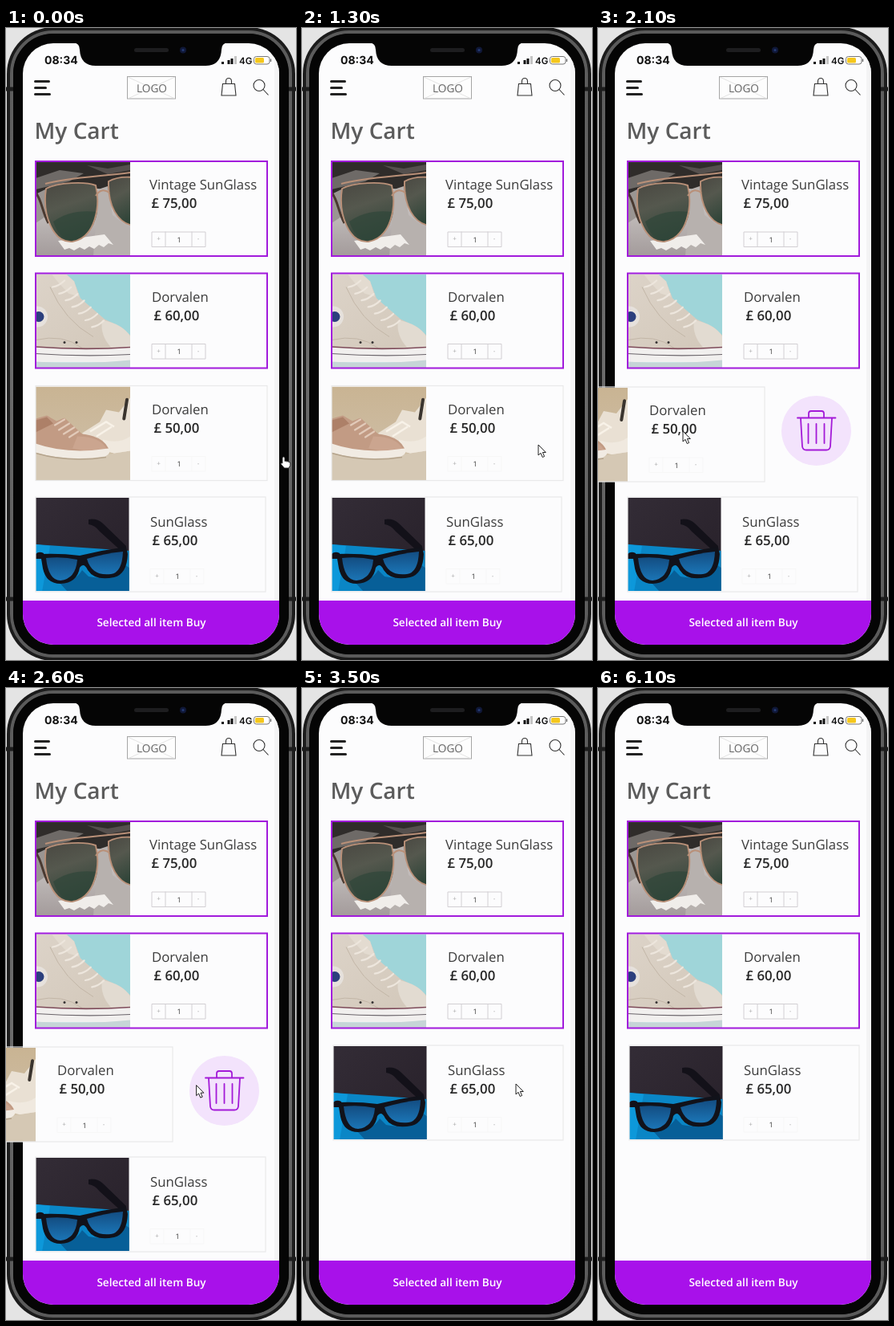
Recreate the animation shown at these times as an HTML page. Size 362 px wide and 787 px high, loop 6200 ms.

```html
<!DOCTYPE html>
<html lang="en">
<head>
<meta charset="utf-8">
<title>My Cart</title>
<style>
html, body { margin: 0; width: 100%; height: 100%; overflow: hidden; background: #e4e4e4; }
svg { display: block; width: 362px; height: 787px; }
text { font-family: "Open Sans", "Noto Sans", sans-serif; text-rendering: geometricPrecision; }
.name { font-size: 16.75px; fill: #3c3c3c; }
.price { font-size: 16.8px; font-weight: 600; fill: #262626; }
.qty { font-size: 9px; fill: #333; text-anchor: middle; }
.sign { font-size: 8px; fill: #aaa; text-anchor: middle; }
.status { font-family: Inter, "Liberation Sans", sans-serif; fill: #111; }
</style>
</head>
<body>
<svg viewBox="0 0 362 787" xmlns="http://www.w3.org/2000/svg">
  <defs>
    <linearGradient id="lens" x1=".2" y1="0" x2=".5" y2="1">
      <stop offset="0" stop-color="#4b4a43"/><stop offset=".4" stop-color="#55584e"/><stop offset="1" stop-color="#2f4438"/>
    </linearGradient>
    <linearGradient id="cloth" x1="0" y1="0" x2="0" y2="1">
      <stop offset="0" stop-color="#cbc7c4"/><stop offset=".5" stop-color="#c4bfbd"/><stop offset="1" stop-color="#a39b9b"/>
    </linearGradient>
    <linearGradient id="blueLens" x1="0" y1="0" x2="0" y2="1">
      <stop offset="0" stop-color="#134d82"/><stop offset="1" stop-color="#1b75b6"/>
    </linearGradient>
    <linearGradient id="night" x1="0" y1="0" x2="1" y2="1">
      <stop offset="0" stop-color="#332c36"/><stop offset="1" stop-color="#272029"/>
    </linearGradient>
    <linearGradient id="sand" x1="0" y1="0" x2="0" y2="1">
      <stop offset="0" stop-color="#c9b493"/><stop offset=".6" stop-color="#cdbca2"/><stop offset="1" stop-color="#d6c9b5"/>
    </linearGradient>
    <linearGradient id="canvas" x1="0" y1="0" x2="1" y2="1">
      <stop offset="0" stop-color="#dcd3c8"/><stop offset="1" stop-color="#d2c7b9"/>
    </linearGradient>
    <linearGradient id="steel" x1="0" y1="0" x2="0" y2="1">
      <stop offset="0" stop-color="#5a5a5a"/><stop offset=".5" stop-color="#6d6d6d"/><stop offset="1" stop-color="#5a5a5a"/>
    </linearGradient>
    <clipPath id="photo"><rect width="118" height="117"/></clipPath>
    <clipPath id="smallPhoto"><rect width="116.500" height="116"/></clipPath>
    <clipPath id="screen"><rect x="21" y="19" width="320" height="749" rx="38"/></clipPath>

    <g id="aviators" clip-path="url(#photo)">
      <rect width="118" height="117" fill="url(#cloth)"/>
      <path d="M0 0H118V50L84 34 40 28 0 42Z" fill="#2f2c2a"/>
      <path d="M0 20L30 10 60 14 42 24 0 34Z" fill="#6e6a67"/>
      <path d="M64 4L90 8 118 3V10L90 15Z" fill="#55504e"/>
      <path d="M0 40L12 34 15 66 0 76Z" fill="#9a9592"/>
      <path d="M78 34L90 30 96 66 118 84V117H72Z" fill="#b7b1ae"/>
      <path d="M28 98L86 90 97 103 91 101 85 106 79 103 73 108 67 105 61 109 55 106 48 110 42 107 36 109Z" fill="#f0edea"/>
      <path d="M0 38C8 48 8 62 16 76" fill="none" stroke="#4a3a31" stroke-width="3"/>
      <path d="M13 33C28 25 62 24 75 29C81 54 75 94 46 99C22 101 8 66 13 33Z" fill="url(#lens)"/>
      <path d="M22 74Q44 58 77 62Q72 92 46 98Q30 97 22 74Z" fill="#30463a" opacity=".7"/>
      <path d="M91 24C100 19 112 18 122 19V79C102 76 90 54 91 24Z" fill="url(#lens)"/>
      <g fill="none" stroke="#b99078" stroke-width="1.900">
        <path d="M13 33C28 25 62 24 75 29C81 54 75 94 46 99C22 101 8 66 13 33Z"/>
        <path d="M91 24C100 19 112 18 122 19V79C102 76 90 54 91 24Z"/>
        <path d="M12 27C40 19 82 18 118 13M75 42Q82 31 92 38"/>
      </g>
    </g>

    <g id="hightop" clip-path="url(#photo)">
      <rect width="118" height="117" fill="#9fd5d9"/>
      <path d="M0 0H38L48 9 56 30 86 56 107 66 118 76V98H0Z" fill="url(#canvas)"/>
      <path d="M20 0H38L48 9 54 28 41 24 28 10Z" fill="#e3dbd0"/>
      <path d="M83 57Q108 62 118 77V91H94Q80 76 83 57Z" fill="#e2dbd1"/>
      <path d="M18 16Q36 58 72 78M0 82Q34 74 58 92" fill="none" stroke="#c2b6a7"/>
      <g fill="none" stroke="#ede6dd" stroke-width="2.200" stroke-linecap="round" id="laces"></g>
      <circle cx="2" cy="53" r="13" fill="#e6e1dc"/>
      <circle cx="4" cy="53" r="6.500" fill="#2b3f7d"/>
      <circle cx="36" cy="85" r="1.500" fill="#383434"/><circle cx="51" cy="85" r="1.500" fill="#383434"/>
      <path d="M0 90Q60 95 118 90V110H0Z" fill="#f1efee"/>
      <path d="M0 90.500Q60 95 118 91" fill="none" stroke="#7d4a58" stroke-width="1.600"/>
      <path d="M0 99Q60 103 118 100" fill="none" stroke="#6a646a" stroke-width="1.200"/>
      <path d="M0 109Q60 113 118 107V117H0Z" fill="#c6d5d7"/>
    </g>

    <g id="trainers" clip-path="url(#photo)">
      <rect width="118" height="117" fill="url(#sand)"/>
      <path d="M0 82Q60 96 118 78V117H0Z" fill="#d5c8b4"/>
      <path d="M58 58L80 44 88 29 104 32 118 14V80L98 83 74 78Z" fill="#e9e0d3"/>
      <path d="M68 56L88 44 98 50M76 62L95 50" fill="none" stroke="#f8f2e8" stroke-width="2.500"/>
      <path d="M84 66Q104 72 118 62V80L98 83 82 78Z" fill="#f0e9df"/>
      <rect x="110" y="14" width="4" height="28" rx="2" transform="rotate(9 111 29)" fill="#3a342e"/>
      <path d="M0 40L14 36 26 43 36 39 58 59Q84 62 91 77L90 84Q40 90 0 74Z" fill="#c29b84"/>
      <path d="M0 42L14 38 22 46 0 57Z" fill="#ad8068"/>
      <path d="M52 62Q80 62 89 78Q66 82 46 77Z" fill="#cba58f"/>
      <path d="M24 48L36 41M29 54L42 46M35 59L48 51M42 63L53 56" stroke="#e2cab9" stroke-width="2.200" stroke-linecap="round"/>
      <path d="M0 71Q40 85 91 77Q95 83 87 87Q40 94 0 82Z" fill="#f1ebe3"/>
      <path d="M0 83Q42 95 88 88" fill="none" stroke="#b5a48d" stroke-width="1.500"/>
    </g>

    <g id="shades" clip-path="url(#smallPhoto)">
      <rect width="118" height="117" fill="url(#night)"/>
      <path d="M0 58L118 66V117H0Z" fill="#0a86c6"/>
      <path d="M0 58L18 60 8 117H0Z" fill="#0d98da"/>
      <path d="M30 106Q50 104 58 90L66 98Q92 104 112 84L118 88V117H40Z" fill="#075f98"/>
      <path d="M66 27Q76 25 84 32L113 60 111 70 80 42Q74 34 66 33Z" fill="#131119"/>
      <path d="M0 70Q4 66 10 69L11 76H0Z" fill="#131119"/>
      <path d="M6 70Q32 69 55 72Q84 65 113 61L115 70Q114 95 98 99Q74 104 65 90Q60 80 55 87Q52 106 31 107Q13 107 9 88Z" fill="#11121a"/>
      <path d="M13 75Q34 73 52 77Q50 101 31 103Q16 103 13 75Z" fill="url(#blueLens)"/>
      <path d="M64 76Q88 69 109 67Q108 93 94 95Q70 98 64 76Z" fill="url(#blueLens)"/>
    </g>
  </defs>

  <!-- phone -->
  <rect width="362" height="787" fill="#e4e4e4"/>
  <path d="M0 76H6M356 76H362M0 711H6M356 711H362" stroke="#1c1c1c" stroke-width="5"/>
  <rect x="1" y="-1" width="360" height="789" rx="58" fill="#1b1b1b"/>
  <rect x="7" y="5" width="348" height="777" rx="52" fill="none" stroke="url(#steel)" stroke-width="4"/>
  <rect x="9" y="7" width="344" height="773" rx="50" fill="#050505"/>
  <path d="M1 76H9M353 76H361M1 711H9M353 711H361" stroke="#1c1c1c" stroke-width="5"/>
  <g clip-path="url(#screen)">
    <rect x="21" y="19" width="320" height="749" fill="#fcfcfd"/>
    <rect x="335" y="19" width="6" height="694" fill="#f4f4f5"/>
  </g>
  <path d="M84 18Q92 19 92 27Q93 47 112 47H249Q268 47 269 27Q269 19 277 18Z" fill="#050505"/>
  <rect x="160" y="25" width="43" height="5" rx="2.500" fill="#1d1d1f"/>
  <circle cx="221" cy="27.500" r="4" fill="#101838"/><circle cx="221" cy="27.500" r="1.600" fill="#243a72"/>

  <!-- status bar and header -->
  <text class="status" x="48" y="45" font-size="14" font-weight="700">08:34</text>
  <path d="M269 42h3v3h-3zM276.500 40h3v5h-3zM280.500 38h3v7h-3z" fill="#111"/>
  <path d="M285 35h3v10h-3z" fill="#c4c4c4"/>
  <text class="status" x="291" y="45" font-size="11.5" font-weight="600">4G</text>
  <rect x="309.500" y="35.500" width="19.500" height="9.500" rx="3" fill="#fff" stroke="#777"/>
  <rect x="311" y="37" width="11" height="6.500" rx="1.500" fill="#f5c71c"/>
  <path d="M330.500 38.500v3.500" stroke="#777" stroke-width="1.500"/>
  <path d="M36.500 66.500H53.500M36.500 74.500H49.500M36.500 82.500H54.500" stroke="#222" stroke-width="3" stroke-linecap="round"/>
  <rect x="151.500" y="60.500" width="60" height="27.500" fill="#fdfdfd" stroke="#a5a5a5"/>
  <path d="M152 61L211 88M211 61L152 88" stroke="#dedede" stroke-width=".8"/>
  <text x="182" y="80" font-size="13.6" fill="#666" text-anchor="middle">LOGO</text>
  <g fill="none" stroke="#333" stroke-width="1.100">
    <path d="M270.500 69.500H285.500L287 84H269ZM274.500 69.500V66.500Q274.500 62.500 278 62.500T281.500 66.500V69.500"/>
    <circle cx="316" cy="71.500" r="7"/><path d="M321 76.500L327.500 83.500"/>
  </g>
  <text x="35.500" y="138" font-size="28" font-weight="600" fill="#5c5c5c">My Cart</text>

  <g id="cards"></g>

  <g id="trash">
    <circle cx="272.500" cy="501.500" r="43.500" fill="#f3e3fc"/>
    <g fill="none" stroke="#a31ad8" stroke-width="1.800" stroke-linecap="round" stroke-linejoin="round">
      <path d="M249 485.500H296.500M263 485V480Q263 477 266 477H279Q282 477 282 480V485"/>
      <path d="M253 486L255 521Q255.500 525.500 260 525.500H285Q289.500 525.500 290 521L292 486"/>
      <path d="M262.500 493V517M272.500 493V517M282.500 493V517"/>
    </g>
  </g>

  <g clip-path="url(#screen)"><rect x="21" y="713" width="320" height="56" fill="#a811ea"/></g>
  <text x="181.500" y="745" font-size="13.6" font-weight="600" fill="#fff" text-anchor="middle">Selected all item Buy</text>

  <g id="pointer" stroke="#222" stroke-linejoin="round" fill="#fff">
    <path id="arrow" d="M0 0V13L3 10.300 5.200 15.500 7.600 14.500 5.400 9.500H9.300Z"/>
    <path id="hand" d="M0 1Q1.500-1 3 1V5.500Q4.500 4.500 5.500 6Q7 5 8 6.500Q9.800 6 9.800 8V10.500L8 14H2.500L-2 9Q-2.500 7 0 8Z" stroke-width=".9"/>
  </g>
</svg>
<script>
const LOOP = 6200, STEP = 100;
const el = id => document.getElementById(id);

let laces = "";
for (let i = 0; i < 7; i++) {
  const x = 21 + i * 8.2, y = 9 + i * 8.3;
  laces += `<path d="M${x} ${y + 7}Q${x + 8} ${y + 6} ${x + 15} ${y - 1}"/>`;
}
el("laces").innerHTML = laces;

// x is the left edge of the quantity box, y the baseline of the name
function card({ id, photo, name, nameX, price, top, width = 289, x = 182, y = top + 35.5, chosen }) {
  const q = y + 52.5, line = chosen ? "#d2cfd3" : "#f7f7f7";
  return `<g id="${id}">
    <use href="#${photo}" x="37" y="${top + 1.5}"/>
    <rect x="37" y="${top + .5}" width="${width}" height="118" fill="none"
      stroke="${chosen ? "#a21bdc" : "#e9e9ea"}" stroke-width="${chosen ? 2 : 1.2}"/>
    <text class="name" x="${nameX ?? x}" y="${y}">${name}</text>
    <text class="price" x="${(nameX ?? x) + 2.5}" y="${y + 23}">£ ${price},00</text>
    <path d="M${x} ${q + .5}h67v18.500h-67zM${x + 17} ${q}v19M${x + 50} ${q}v19" fill="none" stroke="${line}"/>
    <text class="sign" x="${x + 8.5}" y="${q + 11.5}">+</text>
    <text class="qty" x="${x + 34}" y="${q + 13}">1</text>
    <text class="sign" x="${x + 58}" y="${q + 11.5}">-</text>
  </g>`;
}
el("cards").innerHTML = [
  { id: "first", photo: "aviators", name: "Vintage SunGlass", nameX: 179, price: 75, top: 165.5, chosen: true },
  { id: "second", photo: "hightop", name: "Dorvalen", price: 60, top: 305, chosen: true },
  { id: "last", photo: "shades", name: "SunGlass", price: 65, top: 583.5, width: 287, x: 180, y: 620.5 },
  { id: "removed", photo: "trainers", name: "Dorvalen", price: 50, top: 445 }
].map(card).join("");

const [arrow, hand, pointer, trash, removed, last] =
  ["arrow", "hand", "pointer", "trash", "removed", "last"].map(el);

// time, x, y of the pointer tip
const route = [
  [0, 345, 534], [700, 318, 527], [1250, 295, 519], [1400, 295, 519],
  [2000, 106, 502], [2200, 106, 502], [2750, 267, 493], [4200, 267, 493], [4650, 372, 86]
];

function ease(t, from, to) {
  const u = Math.min(1, Math.max(0, (t - from) / (to - from)));
  return u * u * (3 - 2 * u);
}
const move = (node, x, y) => node.setAttribute("transform", `translate(${x} ${y})`);
const show = (node, on) => node.setAttribute("visibility", on ? "visible" : "hidden");

function tip(t) {
  let [, x, y] = route[0];
  for (let i = 1; i < route.length; i++) {
    const [t0, x0, y0] = route[i - 1], [t1, x1, y1] = route[i], k = ease(t, t0, t1);
    x += (x1 - x0) * k;
    y += (y1 - y0) * k;
  }
  return [x, y];
}

function draw(t) {
  const swipe = ease(t, 1400, 2000), drop = ease(t, 2820, 3150);
  move(removed, -118 * swipe, 1.5 * swipe);
  removed.setAttribute("opacity", 1 - drop);
  trash.setAttribute("opacity", ease(t, 1550, 2000) * (1 - drop));
  move(last, 2 * drop, -139 * drop);
  move(pointer, ...tip(t));
  show(hand, t < 400);
  show(arrow, t >= 400 && t < 4650);
}

const start = performance.now();
function tick(now) {
  const t = Math.max(0, now - start) % LOOP;
  draw(Math.floor(t / STEP) * STEP);
  requestAnimationFrame(tick);
}
draw(0);
requestAnimationFrame(tick);
</script>
</body>
</html>
```
